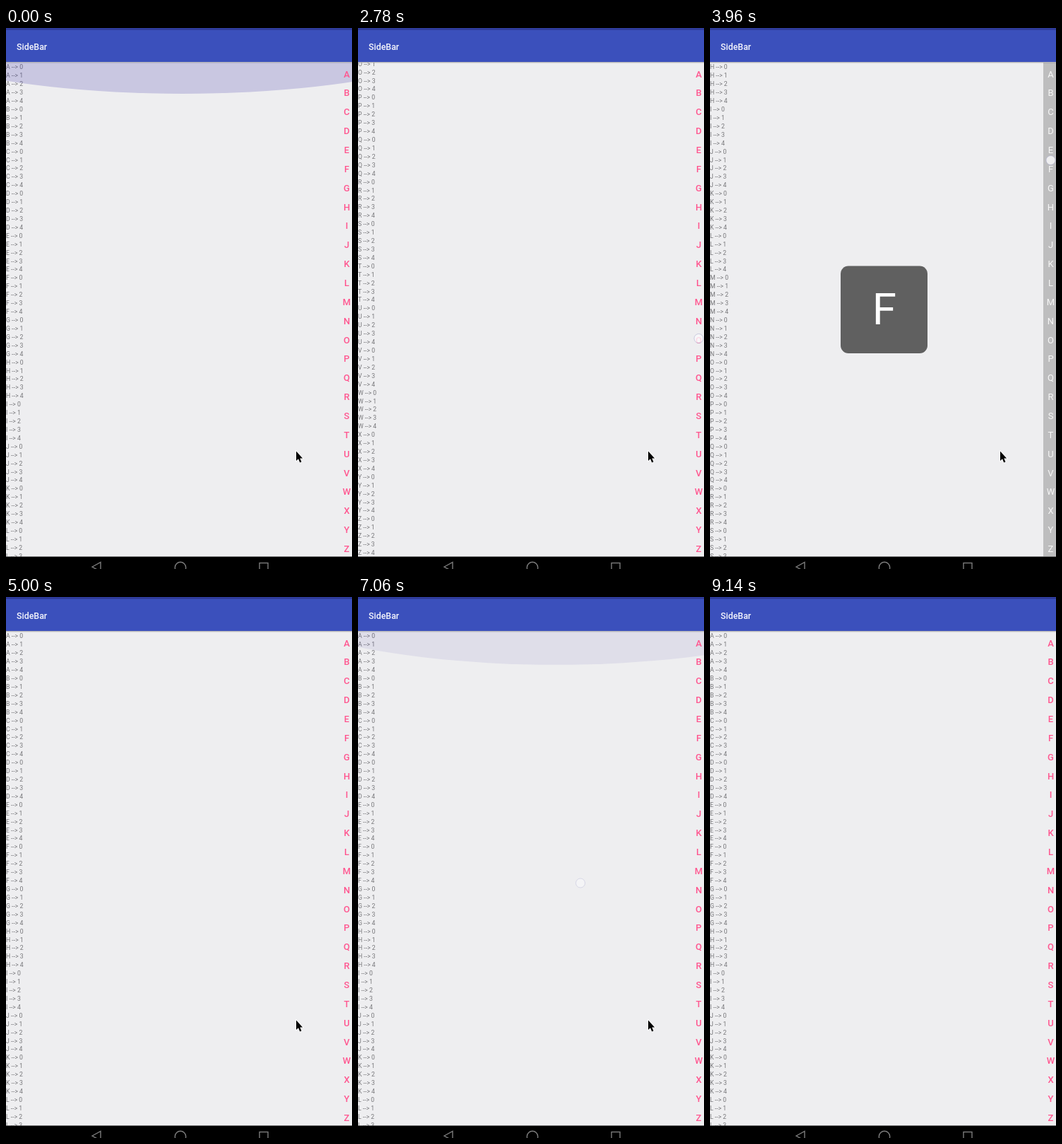
These frames come from a looping animation (490 px wide and 765 px high, 9.58 s). An HTML page with a canvas:

```html
<!DOCTYPE html>
<html lang="en">
<head>
<meta charset="utf-8">
<title>SideBar</title>
<style>
html, body { margin: 0; width: 100%; height: 100%; overflow: hidden; background: #eeeef0; }
canvas { display: block; }
</style>
</head>
<body>
<canvas id="stage" width="490" height="765"></canvas>
<script>
const g = document.getElementById('stage').getContext('2d');
const LOOP = 9580, STEP = 147.3, LAST = 61;
const TOP = 49, BOTTOM = 747.5;
const ROW = 11.92, MAX_SCROLL = 851, PITCH = 26.86;
const LETTERS = [...'ABCDEFGHIJKLMNOPQRSTUVWXYZ'];
const FONT = 'Roboto, "Liberation Sans", sans-serif';

// Drags along the letter bar; times in steps, speed in pixels per step.
const DOWN = { start: 2, end: 17, y: 65, speed: 45.7, lag: .5 };
const UP = { start: 18, end: 31, y: 439, speed: -31.5, lag: 2 };

// Swipes over the list swing it from end to end.
const SWIPES = { start: 37, end: 57, peak: 41, period: 11 };

const clamp = (v, lo, hi) => Math.max(lo, Math.min(hi, v));
const during = (span, n) => n >= span.start && n <= span.end;

// The screen refreshes in steps, not continuously.
const stepAt = t => t < 150 ? 0 : clamp(2 + Math.floor((t - 423) / STEP), 1, LAST);

const dragY = (drag, n) => clamp(drag.y + drag.speed * (n - drag.start), 65, 736);
const letterAt = y => clamp(Math.floor((y - 51.5) / PITCH), 0, 25);

// 0 is the top of the list, 1 the bottom; values beyond are overscroll.
const swing = n => during(SWIPES, n)
  ? .5 + .562 * Math.cos((n - SWIPES.peak) / SWIPES.period * 2 * Math.PI) : 0;

function scrollAt(n) {
  if (n < DOWN.start) return 0;
  if (n > UP.end) return MAX_SCROLL * clamp(swing(n), 0, 1);
  const drag = n <= UP.start ? DOWN : UP;
  return Math.min(MAX_SCROLL, letterAt(dragY(drag, n - drag.lag)) * 5 * ROW);
}

function swipeFinger(n) {
  const k = n - SWIPES.peak;
  return [355 - k * 80 / 12, 517 - k * 18.75 + 110 * Math.sin(k * Math.PI / 2), 1 - k / 18];
}

function rect(color, x, y, w, h) {
  g.fillStyle = color;
  g.fillRect(x, y, w, h);
}

function text(s, x, y, size, color, weight = 400, align = 'left') {
  g.font = `${weight} ${size}px ${FONT}`;
  g.textAlign = align;
  g.fillStyle = color;
  g.fillText(s, x, y);
}

function circle(x, y, r) {
  g.beginPath();
  g.arc(x, y, r, 0, 7);
}

function glow(edge, dir, height, x, alpha) {
  const ry = height * 3;
  g.beginPath();
  g.ellipse(x, edge + dir * (height - ry), 490, ry, 0, 0, 7);
  g.fillStyle = `rgba(65,55,170,${alpha})`;
  g.fill();
}

function drawGlows(n) {
  if (n === 0) glow(TOP, 1, 44, 250, .21);
  const x = 245 + (swipeFinger(n)[0] - 245) / 2;
  const edges = [[TOP, 1, m => -swing(m)], [BOTTOM, -1, m => swing(m) - 1]];
  for (const [edge, dir, excess] of edges) {
    const now = excess(n), before = excess(n - 1);
    const pull = Math.max(now, before) / .062;
    if (pull > 0) glow(edge, dir, 74 * pull, x, now > before ? .09 : .15);
  }
}

function drawList(n) {
  const scroll = scrollAt(n);
  for (let i = 0; i < 130; i++) {
    const y = 58.4 + i * ROW - scroll;
    if (y > 40 && y < 760) text(`${LETTERS[i / 5 | 0]} --> ${i % 5}`, 0, y, 8.7, '#77777a');
  }
}

function drawSideBar(n, drag) {
  const pressed = drag && n > drag.start;
  if (pressed) rect('#bdbdbe', 472, TOP, 18, BOTTOM - TOP);
  LETTERS.forEach((c, i) =>
    text(c, 482.5, 69.5 + i * PITCH, 13, pressed ? '#f6f6f6' : '#ff5790', pressed ? 400 : 500, 'center'));
  if (!pressed) return;
  g.beginPath();
  g.roundRect(185, 336.5, 123, 123.5, 11);
  g.fillStyle = '#606060';
  g.fill();
  text(LETTERS[letterAt(dragY(drag, n - .5))], 247, 419, 62, '#fff', 400, 'center');
}

function drawFinger(x, y, opacity = 1) {
  g.globalAlpha = clamp(opacity, 0, 1);
  circle(x, y, 6.5);
  g.fillStyle = 'rgba(250,250,252,.8)';
  g.fill();
  g.strokeStyle = 'rgba(170,170,205,.55)';
  g.lineWidth = 1;
  g.stroke();
  g.globalAlpha = 1;
}

function drawChrome() {
  rect('#3b50bc', 0, 0, 490, 48);
  rect('#2f3c9b', 0, 0, 490, 3);
  rect('rgba(0,0,0,.22)', 0, 48, 490, 1);
  rect('rgba(0,0,0,.09)', 0, 49, 490, 1);
  text('SideBar', 15, 31, 12.4, '#f4f5fc', 500);
  rect('#000', 0, BOTTOM, 490, 18);
  g.strokeStyle = '#7c7c7c';
  g.lineWidth = 1.4;
  g.stroke(new Path2D('M122 762L134 755.5V768.5Z'));
  circle(247, 763, 7.7);
  g.stroke();
  g.strokeRect(359, 756.5, 12, 12);
}

function drawCursor() {
  const arrow = new Path2D('M411 598.5v13.5l3-2.8 2.2 5.2 2.3-1-2.2-5h3.8Z');
  g.lineWidth = 1.5;
  g.strokeStyle = '#fff';
  g.stroke(arrow);
  g.fillStyle = '#000';
  g.fill(arrow);
}

function draw(n) {
  const drag = [DOWN, UP].find(d => during(d, n));
  rect('#eeeef0', 0, 0, 490, 765);
  g.save();
  g.beginPath();
  g.rect(0, TOP, 490, BOTTOM - TOP);
  g.clip();
  drawList(n);
  drawGlows(n);
  drawSideBar(n, drag);
  if (drag) drawFinger(482.5, dragY(drag, n));
  if (during(SWIPES, n)) drawFinger(...swipeFinger(n));
  g.restore();
  drawChrome();
  if (n < LAST) drawCursor();
}

const start = performance.now();
function tick() {
  draw(stepAt((performance.now() - start) % LOOP));
  requestAnimationFrame(tick);
}
tick();
</script>
</body>
</html>
```
